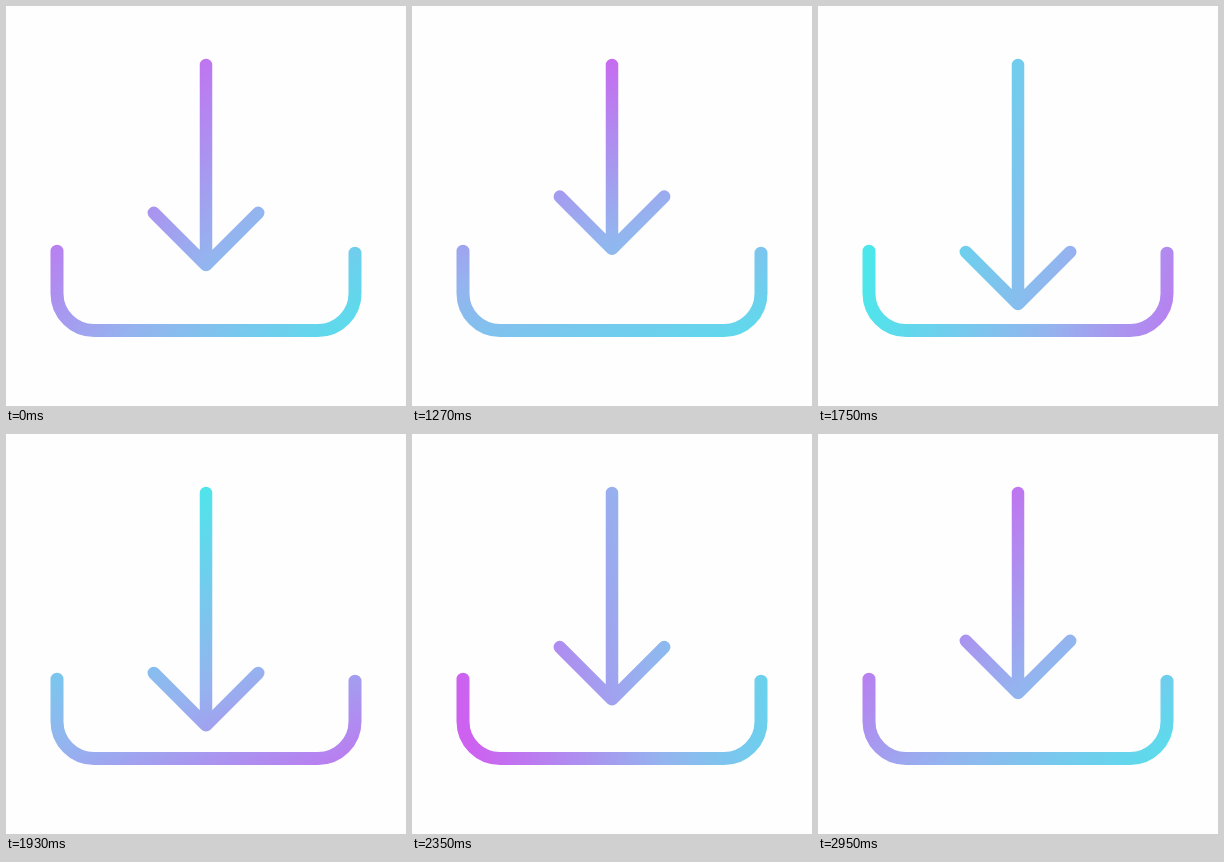
Write an HTML page that moves like this. It is 400 px wide and 400 px high and loops after 2.98 s.

```html
<!DOCTYPE html>
<html lang="en">
<head>
<meta charset="utf-8">
<title>Download</title>
<style>
  html, body { margin: 0; width: 100%; height: 100%; overflow: hidden; background: #fefefe; }
  svg { display: block; width: 100vw; height: 100vh; }
  path { fill: none; stroke: url(#tint); stroke-linecap: round; stroke-linejoin: round; }
</style>
</head>
<body>
<svg viewBox="0 0 400 400">
  <defs>
    <linearGradient id="tint" gradientUnits="userSpaceOnUse">
      <stop offset="0" stop-color="rgb(205,97,240)"/>
      <stop offset=".5" stop-color="rgb(148,180,239)"/>
      <stop offset="1" stop-color="rgb(77,230,235)"/>
    </linearGradient>
  </defs>
  <path stroke-width="13" d="M51 245.2V287.5A37 37 0 0 0 88 324.5H312A37 37 0 0 0 349 287.5V247.2"/>
  <path id="arrow" stroke-width="12.5"/>
</svg>
<script>
const LOOP = 2980, HOLD = 1030, STEP = 30;

// Turning points of the arrow tip: share of the move, offset in px
const BOUNCE = [[0, 0], [.065, -24], [.4, 39.5], [.66, 5], [.8, 14.7], [1, 0]];

const arrow = document.getElementById('arrow');
const tint = document.getElementById('tint');

const smooth = u => u * u * (3 - 2 * u);

function bounce(u) {
  const next = Math.max(1, BOUNCE.findIndex(([at]) => at >= u));
  const [u0, y0] = BOUNCE[next - 1], [u1, y1] = BOUNCE[next];
  return y0 + (y1 - y0) * smooth((u - u0) / (u1 - u0));
}

// One full turn that gathers speed a little faster than it loses it.
const turn = u => Math.PI * (.25 + 2 * smooth(1 - (1 - u) ** 1.2));

function setTint(angle) {
  const place = (end, dist) => {
    tint.setAttribute('x' + end, 245 + dist * Math.cos(angle));
    tint.setAttribute('y' + end, 222 + dist * Math.sin(angle));
  };
  place(1, -198);
  place(2, 180);
}

function draw(time) {
  const frame = Math.floor((time % LOOP - HOLD) / STEP) + 1;
  const u = Math.max(0, frame) * STEP / (LOOP - HOLD + STEP);
  const share = Math.min(1, u * (LOOP - HOLD + STEP) / (LOOP - HOLD));
  const tip = 259 + bounce(share), arm = tip - 52.2;
  arrow.setAttribute('d', `M200 59V${tip}M147.8 ${arm}L200 ${tip}L252.2 ${arm}`);
  setTint(turn(share));
}

const start = performance.now();
function tick() {
  draw(performance.now() - start);
  requestAnimationFrame(tick);
}
tick();
</script>
</body>
</html>
```
